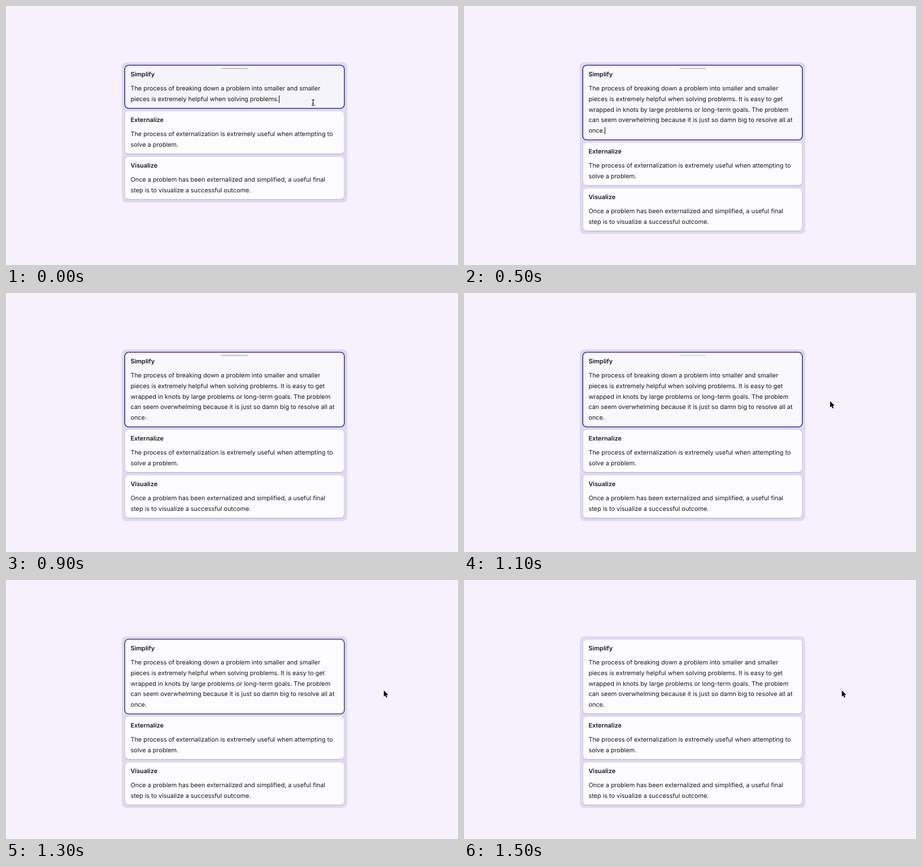
An HTML page that plays this animation: 800x460 px, repeating every 2200 ms.

```html
<!DOCTYPE html>
<html lang="en">
<head>
<meta charset="utf-8">
<title>Growing note card</title>
<style>
  html, body { margin: 0; width: 100%; height: 100%; overflow: hidden; background: #f6f1fc; }
  body {
    position: relative;
    font: 10.89px/18.67px Inter, sans-serif;
    color: #17161b;
    text-rendering: geometricPrecision;
  }
  .list {
    position: absolute; left: 205px; top: 100px; width: 386.5px; padding: 6px;
    display: grid; gap: 6px;
    border-radius: 8px; background: #dfdaf1;
  }
  .card {
    position: relative; padding: 6.2px 9.4px 6.47px;
    border-radius: 6px; background: #fdfcfe;
    box-shadow: 0 1px 2px rgba(60, 50, 110, .25);
  }
  h2 { margin: 0 0 6.33px; font: inherit; font-weight: 600; }
  p { margin: 0; white-space: pre; }
  #handle {
    position: absolute; left: 170px; top: 4px; width: 46.5px; height: 1.7px;
    border-radius: 1px; background: #c6c5d1;
  }
  #caret {
    display: inline-block; width: 1.1px; height: 13px; margin-right: -1.1px;
    vertical-align: -3px; background: #111;
  }
  svg { position: absolute; left: 0; top: 0; }
</style>
</head>
<body>
<div class="list">
  <section class="card" id="active"><div id="handle"></div><h2>Simplify</h2><p><span id="text"></span><i id="caret"></i></p></section>
  <section class="card"><h2>Externalize</h2><p>The process of externalization is extremely useful when attempting to
solve a problem.</p></section>
  <section class="card"><h2>Visualize</h2><p>Once a problem has been externalized and simplified, a useful final
step is to visualize a successful outcome.</p></section>
</div>
<svg width="800" height="460">
  <path id="beam" d="M-2.7 -5.3Q0 -5.3 0 -3.8Q0 -5.3 2.7 -5.3M0 -3.8V3.8M-2.7 5.3Q0 5.3 0 3.8Q0 5.3 2.7 5.3M-1.3 1.8H1.3"
    fill="none" stroke="#111" stroke-width="1.1"/>
  <path id="arrow" d="M0 0V11.3L2.6 9L4.3 13L6.2 12.2L4.5 8.3H8Z"
    fill="#0b0b0d" stroke="#fff" stroke-width=".9" paint-order="stroke"/>
</svg>
<script>
const LOOP = 2200, STEP = 100;
const [active, handle, text, caret, beam, arrow] =
  ['active', 'handle', 'text', 'caret', 'beam', 'arrow'].map(id => document.getElementById(id));

const intro = `The process of breaking down a problem into smaller and smaller
pieces is extremely helpful when solving problems.`;
const more = ` It is easy to get
wrapped in knots by large problems or long-term goals. The problem
can seem overwhelming because it is just so damn big to resolve all at
once.`;

const clamp = v => Math.max(0, Math.min(1, v));
const place = (el, visible, x, y) => {
  el.style.display = visible ? '' : 'none';
  el.setAttribute('transform', `translate(${x} ${y})`);
};
const ringColor = t => t < 1300 ? '#3932a4' : t < 1400 ? '#4a4685' : '#55545f';

function draw(t) {
  text.textContent = intro + (t < 100 ? '' : t < 500 ? ' ' : more);
  caret.style.opacity = clamp((900 - t) / 300);
  handle.style.opacity = clamp((1200 - t) / 200);

  active.style.background = t < 500 ? '#f5f4fb' : t < 1300 ? '#f9f8fe' : '#fdfcfe';
  active.style.boxShadow = t < 1500 ? `0 0 0 1.6px ${ringColor(t)}` : '';

  const moving = t >= 1000 && t < 1100;
  place(beam, t < 100 || moving, moving ? 568 : 543.5, moving ? 176 : 171.5);
  place(arrow, t >= 1100, t < 1200 ? 648 : 668.7, t < 1200 ? 192 : 196);
}

function tick() {
  draw(Math.floor(performance.now() % LOOP / STEP) * STEP);
  requestAnimationFrame(tick);
}
tick();
</script>
</body>
</html>
```
